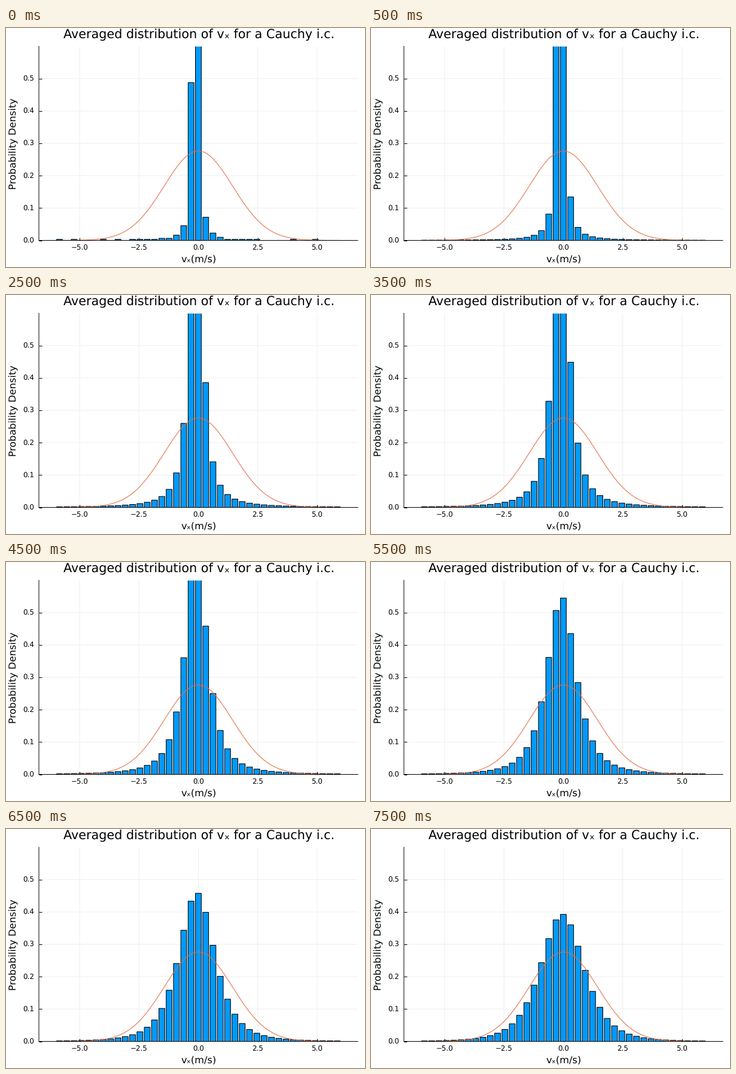
A matplotlib script that plays this animation: 600x400 px, repeating every 8 s.

```python
import numpy as np
import matplotlib.pyplot as plt
from matplotlib.animation import FuncAnimation

W, H, DPI = 600, 400, 100
PX = 72 / DPI
FRAMES, INTERVAL = 16, 500
LEFT, RIGHT, TOP, BOTTOM = 55, 588, 30.5, 355.5
X_SCALE, Y_MAX = 39.7, 0.6
BIN = 12 / 39
SAMPLES = 1000
SIGMA = 1.444
BLUE, ORANGE, GRID = "#009AFA", "#E26F46", "#efefef"

plt.rcParams.update({"font.family": "DejaVu Sans", "path.snap": False,
                     "text.hinting": "none"})

bins = np.arange(-19, 20)


def density(step):
    """Histogram relaxing from a narrow Cauchy peak to a wide, light-tailed one."""
    width = 0.106 + 0.0885 * step + 0.0072 * step**2 + 0.00084 * step**3
    power = 1 + 1.33 * (step / 15) ** 2.7
    shift = 0.33 - 0.00005 * step**3
    x = bins[:, None] + shift + np.linspace(-0.5, 0.5, 201)
    share = ((1 + (x / width) ** 2) ** -power).mean(axis=1)
    share /= share.sum()
    if step == 0:
        # a single sample of particles: whole counts, sparse tails
        rng = np.random.default_rng(4)
        share = np.floor(share * SAMPLES + rng.random(bins.size)) / SAMPLES
    return share / BIN


fig = plt.figure(figsize=(W / DPI, H / DPI), dpi=DPI, facecolor="white")
ax = fig.add_axes([LEFT / W, 1 - BOTTOM / H,
                   (RIGHT - LEFT) / W, (BOTTOM - TOP) / H])
half = (RIGHT - LEFT) / 2 / X_SCALE
ax.set(xlim=(-half, half), ylim=(0, Y_MAX))
x_ticks = np.arange(-5, 5.1, 2.5)
y_ticks = np.arange(6) / 10
ax.set_xticks(x_ticks, [])
ax.set_yticks(y_ticks, [])
ax.set_axisbelow(True)
ax.tick_params(direction="in", length=5 * PX, width=PX)
ax.grid(color=GRID, linewidth=PX)
ax.spines[["top", "right"]].set_visible(False)
ax.spines[["left", "bottom"]].set(linewidth=PX, zorder=3)


def label(x, y, text, size, ha="center", **kw):
    fig.text(x / W, 1 - y / H, text, fontsize=size * PX, ha=ha,
             va="baseline", **kw)


mid = (LEFT + RIGHT) / 2
label(mid + 1, 18, "Averaged distribution of vₓ for a Cauchy i.c.", 20.75)
label(mid + 0.5, 391.5, "vₓ(m/s)", 16.3)
label(17, 193.5, "Probability Density", 16.3, rotation=90,
      rotation_mode="anchor")
for t in x_ticks:
    label(mid + t * X_SCALE, 371.5, f"{t:.1f}".replace("-", "−"), 11.9)
for t in y_ticks:
    y = BOTTOM - t / Y_MAX * (BOTTOM - TOP)
    label(47.5, y + 4.3, f"{t:.1f}", 11.9, ha="right")

bars = ax.bar(bins * BIN, density(0), 0.8 * BIN, color=BLUE,
              edgecolor="black", linewidth=1.07 * PX)
xs = np.linspace(-6, 6, 400)
ax.plot(xs, np.exp(-xs**2 / (2 * SIGMA**2)) / (SIGMA * np.sqrt(2 * np.pi)),
        color=ORANGE, linewidth=1.07 * PX)


def update(step):
    for bar, h in zip(bars, density(step)):
        bar.set_height(h)
    return list(bars)


anim = FuncAnimation(fig, update, frames=FRAMES, interval=INTERVAL,
                     repeat=True, repeat_delay=0)
plt.show()
```
